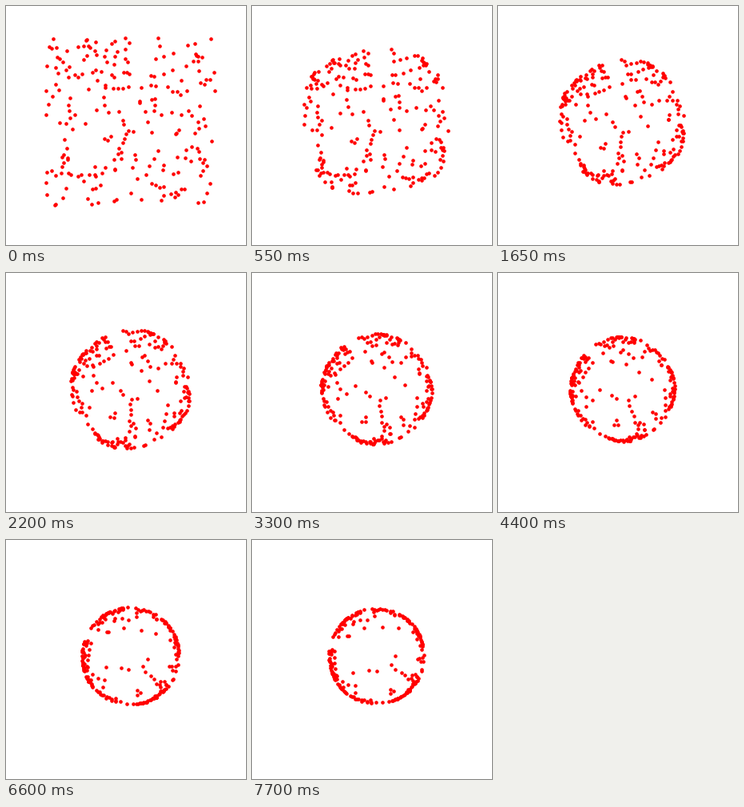
These frames come from a looping animation (300x299 px, 8 s). A matplotlib script:

```python
import numpy as np
import matplotlib.pyplot as plt
from matplotlib.animation import FuncAnimation

W, H = 300, 299
CX, CY, UNIT = 155, 144.5, 53   # origin and one plane unit, in pixels
DT, OMEGA = 0.05, 2
STEPS, HOLD, TICK = 15, 11, 50  # a step lasts HOLD ticks of TICK ms
CORE, OUTER = 1.095, 186

# starting places of the inner particles, in pixels
INNER = [
    (123, 98), (123, 101), (133, 102), (139, 102), (145, 102), (152, 100),
    (168, 101), (180, 98), (186, 99), (121, 113), (122, 123), (112, 129),
    (127, 132), (140, 131), (145, 142), (146, 147), (152, 155), (158, 156),
    (149, 159), (147, 165), (145, 170), (140, 177), (143, 182), (143, 190),
    (139, 184), (160, 185), (161, 191), (134, 191), (157, 201), (122, 165),
    (130, 162), (126, 167), (166, 118), (166, 120), (181, 116), (185, 115),
    (185, 123), (173, 131), (184, 130), (193, 135), (206, 132), (176, 144),
    (181, 157), (211, 159), (189, 180), (184, 190), (98, 146),
]


def start():
    inner = (np.array(INNER) - (CX, CY)) / (UNIT, -UNIT)
    rng = np.random.default_rng(12)
    outer = rng.uniform(-2, 2, (600, 2))
    outer = outer[np.hypot(*outer.T) > CORE][:OUTER]
    return np.vstack([inner, outer]).T


def advance(p):
    """One Euler step of a Hopf oscillator."""
    x, y = p
    pull = 1 - x**2 - y**2
    return p + DT * np.array([pull * x - OMEGA * y, pull * y + OMEGA * x])


path = [start()]
for _ in range(STEPS - 1):
    path.append(advance(path[-1]))

fig = plt.figure(figsize=(W / 100, H / 100), dpi=100, facecolor="white")
ax = fig.add_axes([0, 0, 1, 1])
ax.set_xlim(0, W)
ax.set_ylim(H, 0)
ax.axis("off")
dots, = ax.plot([], [], "r.", markersize=4.6)


def draw(i):
    x, y = path[i // HOLD]
    dots.set_data(CX + 0.5 + UNIT * x, CY + 0.5 - UNIT * y)
    return dots,


anim = FuncAnimation(fig, draw, frames=8000 // TICK, interval=TICK,
                     repeat=True, repeat_delay=0, blit=False)
plt.show()
```
